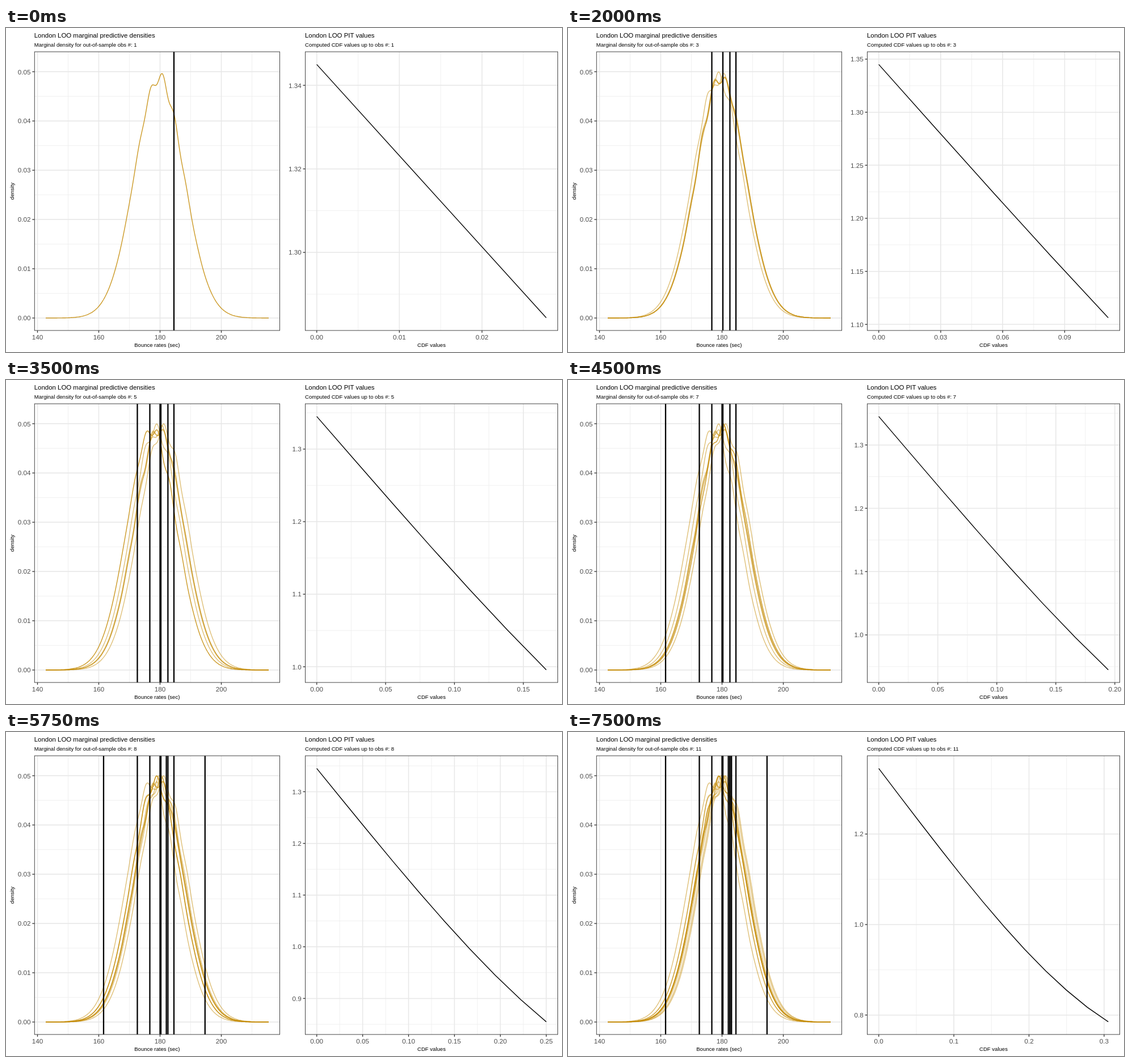
These frames come from a looping animation (980x572 px, 8 s). An HTML page:

```html
<!DOCTYPE html>
<html lang="en">
<head>
<meta charset="utf-8">
<style>
html, body { margin: 0; width: 100%; height: 100%; overflow: hidden; background: #fff; }
svg { display: block; font-family: "Liberation Sans", Arial, sans-serif; }
.title { font-size: 11.45px; }
.sub { font-size: 9.55px; }
.tick { font-size: 11.7px; fill: #4d4d4d; }
.mid { text-anchor: middle; }
.end { text-anchor: end; }
path { fill: none; }
</style>
</head>
<body>
<svg id="stage" width="980" height="572" viewBox="0 0 980 572"></svg>
<script>
const TOP = 42, BOTTOM = 534, BASE = 512, LOOP = 8000, STEP = 750;

// Per observation: its vertical line, the middle of its density and the density's peak
const observations = [
  [296, 270, 276], [285.4, 269, 257], [253.5, 264, 266], [273, 270, 257],
  [271.5, 277, 278], [231.5, 257, 268], [172, 272, 274], [282.6, 270, 270],
  [350.8, 264.5, 266], [288.2, 275, 276], [285.4, 269, 266]
];

const bell = (x, middle, sd) => Math.exp(-(((x - middle) / sd) ** 2) / 2);

// A bell with a ripple that makes the peak and the shoulders beside it
function densityPath([, middle, peak]) {
  const points = [];
  for (let x = 70; x <= 463; x += 1.5) {
    const ripple = 11 * Math.cos((x - peak) * Math.PI / 11) * bell(x, peak, 24);
    points.push(x + " " + (BASE - 424 * bell(x, middle, 43.3) - ripple).toFixed(2));
  }
  return "M" + points.join("L");
}
const paths = observations.map(densityPath);

// Right-hand curve after i of 36 steps: a straight fall that slowly levels off
const pit = i => 1.345 - .0607 * i + .1077 * (i / 11) ** 3.25;

const line = (x1, y1, x2, y2, color, width) =>
  `<path d="M${x1} ${y1}L${x2} ${y2}" stroke="${color}" stroke-width="${width}"/>`;
const text = (x, y, cls, s, extra = "") =>
  `<text x="${x}" y="${y}" class="${cls}" ${extra}>${s}</text>`;

// An axis for the data range lo..hi, with the smallest round step that is not too dense
function axis(lo, hi, nice, pos) {
  const range = hi - lo, pad = range * .05;
  let unit = 10 ** Math.floor(Math.log10(range) - 1), step;
  while (!step) {
    step = nice.map(q => q * unit).find(s => range / s < 5.4);
    unit *= 10;
  }
  step = +step.toPrecision(3);
  const digits = step < 1 ? String(step).length - 2 : 0;
  const breaks = s => {
    const out = [];
    for (let i = Math.ceil((lo - pad) / s); i * s <= hi + pad; i++) out.push(i * s);
    return out;
  };
  return { pos, major: breaks(step), minor: breaks(step / 2), label: v => v.toFixed(digits) };
}

function panel(left, right, ax, ay, content) {
  let grid = "", ticks = "";
  for (const [kind, color, width] of [["minor", "#ededed", .8], ["major", "#e8e8e8", 1.5]]) {
    for (const x of ax[kind].map(ax.pos)) grid += line(x, TOP, x, BOTTOM, color, width);
    for (const y of ay[kind].map(ay.pos)) grid += line(left, y, right, y, color, width);
  }
  for (const v of ax.major) {
    const x = ax.pos(v);
    ticks += line(x, BOTTOM, x, BOTTOM + 4, "#333", 1.3) + text(x, 550, "tick mid", ax.label(v));
  }
  for (const v of ay.major) {
    const y = ay.pos(v);
    ticks += line(left - 4, y, left, y, "#333", 1.3) + text(left - 6.8, y + 4.3, "tick end", ay.label(v));
  }
  return grid + content + ticks +
    `<rect x="${left}" y="${TOP}" width="${right - left}" height="${BOTTOM - TOP}" fill="none" stroke="#444"/>`;
}

function densities(n) {
  const curves = paths.slice(0, n).map((d, i) =>
    `<path d="${d}" stroke="#c58c0a" stroke-width="1.4" stroke-opacity="${i == n - 1 ? .88 : .55}"/>`);
  const marks = observations.slice(0, n).map(([x]) => line(x, TOP, x, BOTTOM, "#000", 2.3));
  return panel(50.3, 482.5,
    axis(142.6, 215.5, [1, 2, 5], v => 55.5 + (v - 140) * 5.4),
    axis(0, .0514, [1, 2, 5], v => BASE - v * 8696),
    curves.join("") + marks.join(""));
}

function pitPanel(n) {
  const left = 527.5, right = 972.5, w = (right - left) / 1.1, h = (BOTTOM - TOP) / 1.1;
  const xMax = n / 36, yMax = pit(0), yMin = pit(n);
  const px = v => left + w * (.05 + v / xMax);
  const py = v => TOP + h * (.05 + (yMax - v) / (yMax - yMin));
  const points = Array.from({ length: n + 1 }, (_, i) => px(i / 36) + " " + py(pit(i)));
  return panel(left, right,
    axis(0, xMax, [1, 2, 3, 5], px),
    axis(yMin, yMax, [1, 2, 2.5, 5], py),
    `<path d="M${points.join("L")}" stroke="#000" stroke-width="1.4"/>`);
}

function scene(n, count) {
  return densities(n) + pitPanel(n) +
    text(49.7, 16.7, "title", "London LOO marginal predictive densities") +
    text(49.7, 33, "sub", "Marginal density for out-of-sample obs #: " + count) +
    text(527, 16.7, "title", "London LOO PIT values") +
    text(527, 33, "sub", "Computed CDF values up to obs #: " + count) +
    text(266.3, 563, "sub mid", "Bounce rates (sec)") +
    text(750, 563, "sub mid", "CDF values") +
    text(0, 0, "sub mid", "density", 'transform="translate(14.3 288) rotate(-90)"');
}

const stage = document.getElementById("stage");
let shown = "";
function tick() {
  const t = performance.now() % LOOP;
  // The plots run ahead of the counter in the captions
  const n = 1 + Math.floor((t + 250) / STEP), count = 1 + Math.floor(t / STEP);
  const key = n + "/" + count;
  if (key != shown) {
    stage.innerHTML = scene(n, count);
    shown = key;
  }
  requestAnimationFrame(tick);
}
tick();
</script>
</body>
</html>
```
